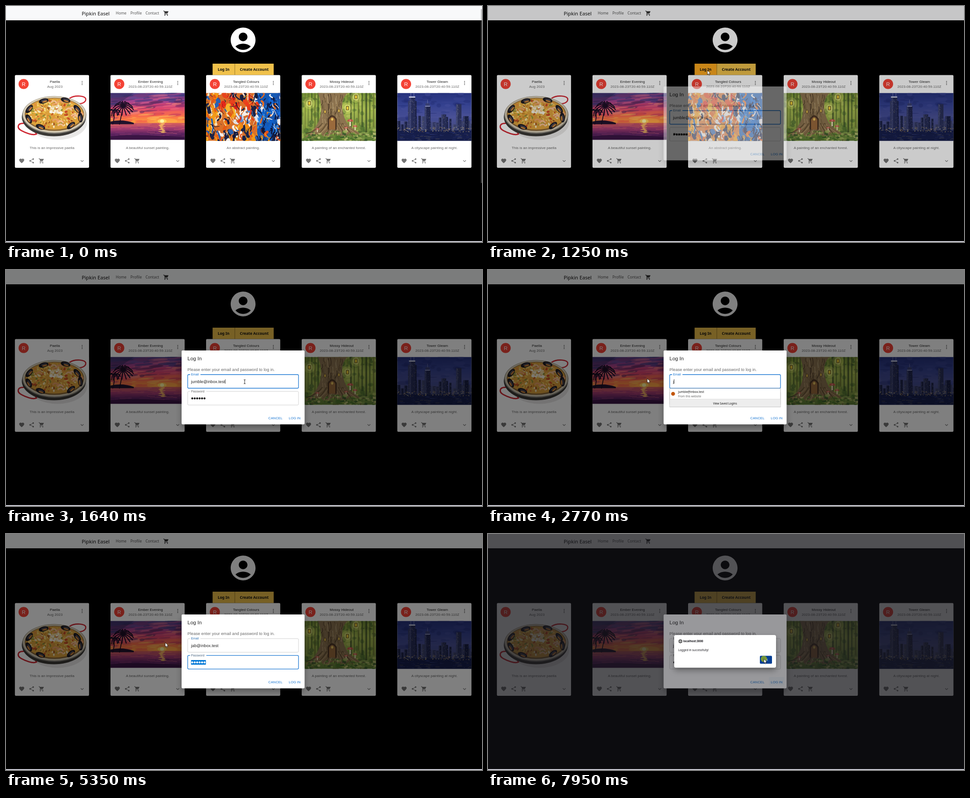
An HTML page that plays this animation: 1061x528 px, repeating every 8 s.

```html
<!DOCTYPE html>
<html lang="en">
<head>
<meta charset="utf-8">
<title>Gallery login</title>
<style>
  html, body { margin: 0; width: 100%; height: 100%; overflow: hidden; background: #000; }
  svg { display: block; }
  text { white-space: pre; font-family: "Liberation Sans", Arial, sans-serif; }
  .ui { font-family: "Noto Sans", "Open Sans", sans-serif; }
  .mid { text-anchor: middle; }
  .bold { font-weight: 700; }
</style>
</head>
<body>
<svg id="stage" width="1061" height="528" viewBox="0 0 1061 528"></svg>
<script>
const LOOP = 8000;
const BLUE = [25, 118, 210], GRAY = [102, 102, 102];

// ---------- SVG helpers ----------
let seed = 7;
const rnd = (a = 1, b = 0) => {
  seed = (seed * 16807) % 2147483647;
  return b + (a - b) * seed / 2147483647;
};
const pick = list => list[Math.floor(rnd() * list.length)];
const many = (n, make) => Array.from({ length: n }, (_, i) => make(i)).join('');
const n1 = v => +v.toFixed(1);
const rect = (x, y, w, h, fill, more = '') =>
  `<rect x="${n1(x)}" y="${n1(y)}" width="${n1(w)}" height="${n1(h)}" fill="${fill}" ${more}/>`;
const oval = (x, y, rx, ry, fill, more = '') =>
  `<ellipse cx="${n1(x)}" cy="${n1(y)}" rx="${n1(rx)}" ry="${n1(ry)}" fill="${fill}" ${more}/>`;
const path = (d, fill, more = '') => `<path d="${d}" fill="${fill}" ${more}/>`;
const line = (d, stroke, width, more = '') =>
  path(d, 'none', `stroke="${stroke}" stroke-width="${n1(width)}" stroke-linecap="round" ${more}`);
const text = (x, y, size, str, fill, more = '') =>
  `<text x="${x}" y="${y}" font-size="${size}" fill="${fill}" ${more}>${str}</text>`;
const gradient = (id, ...colors) =>
  `<linearGradient id="${id}" x2="0" y2="1">${colors.map((c, i) =>
    `<stop offset="${i / (colors.length - 1)}" stop-color="${c}"/>`).join('')}</linearGradient>`;

const ICONS = {
  account: 'M12 2C6.48 2 2 6.48 2 12s4.48 10 10 10 10-4.48 10-10S17.52 2 12 2zm0 4c1.93 0 3.5 1.57 3.5 3.5S13.93 13 12 13s-3.5-1.57-3.5-3.5S10.07 6 12 6zm0 14c-2.03 0-4.43-.82-6.14-2.88C7.55 15.8 9.68 15 12 15s4.45.8 6.14 2.12C16.43 19.18 14.03 20 12 20z',
  heart: 'M12 21.35l-1.45-1.32C5.4 15.36 2 12.28 2 8.5 2 5.42 4.42 3 7.5 3c1.74 0 3.41.81 4.5 2.09C13.09 3.81 14.76 3 16.5 3 19.58 3 22 5.42 22 8.5c0 3.78-3.4 6.86-8.55 11.54z',
  share: 'M18 16.08c-.76 0-1.44.3-1.96.77L8.91 12.7c.05-.23.09-.46.09-.7s-.04-.47-.09-.7l7.05-4.11c.54.5 1.25.81 2.04.81 1.66 0 3-1.34 3-3s-1.34-3-3-3-3 1.34-3 3c0 .24.04.47.09.7L8.04 9.81C7.5 9.31 6.79 9 6 9c-1.66 0-3 1.34-3 3s1.34 3 3 3c.79 0 1.5-.31 2.04-.81l7.12 4.16c-.05.21-.08.43-.08.65 0 1.61 1.31 2.92 2.92 2.92s2.92-1.31 2.92-2.92-1.31-2.92-2.92-2.92z',
  cart: 'M7 18c-1.1 0-1.99.9-1.99 2S5.9 22 7 22s2-.9 2-2-.9-2-2-2zM1 2v2h2l3.6 7.59-1.35 2.45c-.16.28-.25.61-.25.96 0 1.1.9 2 2 2h12v-2H7.42c-.14 0-.25-.11-.25-.25l.03-.12.9-1.63h7.45c.75 0 1.41-.41 1.75-1.03l3.58-6.49c.08-.14.12-.31.12-.48 0-.55-.45-1-1-1H5.21l-.94-2H1zm16 16c-1.1 0-1.99.9-1.99 2s.89 2 1.99 2 2-.9 2-2-.9-2-2-2z',
  more: 'M12 4a2 2 0 100 4 2 2 0 000-4zm0 6a2 2 0 100 4 2 2 0 000-4zm0 6a2 2 0 100 4 2 2 0 000-4z',
  expand: 'M16.59 8.59L12 13.17 7.41 8.59 6 10l6 6 6-6z'
};
const icon = (name, cx, cy, fill, scale = .565) =>
  path(ICONS[name], fill, `transform="translate(${cx} ${cy}) scale(${scale}) translate(-12 -12)"`);

// ---------- Pictures, each 166 x 107 ----------
function paella() {
  const inPan = make => { const a = rnd(6.28), r = Math.sqrt(rnd()); return make(88 + 59 * r * Math.cos(a), 46 + 31 * r * Math.sin(a), a); };
  const mussel = (x, y, a) => `<g transform="translate(${x} ${y}) rotate(${a})">` +
    oval(0, 0, 11, 5.5, '#1c1a22') + oval(1, -1, 7, 2, '#4b4650') + oval(2, 2, 6, 1.8, '#c98238') + '</g>';
  return rect(0, 0, 166, 107, '#fff') + oval(95, 66, 66, 39, '#e9e8e7') +
    line('M122 12C134 4 158 6 158 14S148 25 139 24', '#cf2a35', 2.6) +
    line('M19 68C4 68 5 79 14 84S40 96 48 92L45 86', '#cf2a35', 3) +
    oval(87, 54, 71.5, 43, '#3a3835') + oval(88, 49, 71.5, 42, '#8e8a80') + oval(88, 48, 70, 40.5, '#d8cdb5') + oval(88, 48, 66, 37, '#8a6636') + oval(88, 47, 64, 35, '#dca13c') +
    many(260, () => inPan((x, y, a) => oval(x, y, rnd(4, 1), rnd(2.4, .8),
      pick(['#edbb46', '#f4d274', '#cd862a', '#e2913f', '#f6e4b4', '#a55a22', '#8a9138', '#c94a26', '#f0c65a']), `transform="rotate(${n1(a * 57)} ${n1(x)} ${n1(y)})"`))) +
    many(15, i => inPan((x, y) => line(`M${n1(x - 6)} ${n1(y)}q6 -6 11 1`, i % 2 ? '#e9a066' : '#f3bd90', 3.5))) +
    mussel(32, 36, -50) + mussel(31, 58, 60) + mussel(57, 76, 20) + mussel(125, 73, -40) + mussel(139, 36, 50) + mussel(146, 55, 85) + mussel(64, 18, -15) + mussel(113, 16, 15) +
    many(34, () => oval(rnd(104, 76), rnd(47, 28), rnd(5, 2), rnd(3, 1.5), pick(['#f6ead0', '#eed7a0', '#faf3e2', '#f2d9a4'])));
}

function sunset() {
  const cloud = (y, colors) => oval(rnd(170, -5), y, rnd(22, 5), rnd(3.2, .8), pick(colors), `opacity=".6" transform="rotate(-4 83 ${n1(y)})"`);
  return `<defs>${gradient('sky', '#4a3f86', '#a04390', '#dd4a72', '#f9704a', '#fda23e')}${gradient('sea', '#d8605c', '#a53c70', '#5b235f', '#3c1745')}</defs>` +
    rect(0, 0, 166, 68, 'url(#sky)') +
    many(50, () => cloud(rnd(24), ['#3a3a7c', '#5b4a92', '#b04c88', '#e06c8c', '#3c2c5e', '#7a3a78'])) +
    many(45, () => cloud(rnd(46, 22), ['#d83e6a', '#8a2f68', '#f0687c', '#b23872', '#602a60', '#f48878'])) +
    many(32, () => cloud(rnd(64, 46), ['#f2564e', '#f98a48', '#c23a62', '#f76a52', '#fdb45a'])) +
    path('M0 0H52Q36 12 0 34z', '#322a5e', 'opacity=".55"') +
    oval(115, 63, 34, 7, '#ffb347', 'opacity=".55"') + oval(115, 63, 10, 5, '#ffd75c', 'opacity=".8"') + oval(115, 63, 4.5, 4, '#fff6a6') +
    rect(0, 67, 166, 38, 'url(#sea)') +
    many(90, () => { const y = rnd(98, 68);
      return rect(rnd(160, -15), y, rnd(30, 6), rnd(1.3, .4), pick(y < 84 ? ['#f08a6a', '#b84878', '#e0666a', '#7c2f6c'] : ['#8a3a78', '#42184c', '#c4587c', '#6a2a6a']), 'opacity=".65"'); }) +
    many(16, i => oval(115 + rnd(4, -4), 68 + i * 1.4, rnd(8, 2), .6, '#ffc861')) +
    path('M0 97Q60 91 166 99V105H0z', '#3a1544') + path('M0 64Q26 58 52 67V70H0z', '#22122c') +
    line('M20 70Q24 52 28 30M5 70Q10 54 8 40', '#190c20', 1.8) +
    many(15, i => { const a = i * .42, x = 28 + 23 * Math.cos(a), y = 30 + 13 * Math.sin(a);
      return line(`M28 30Q${n1((28 + x) / 2)} ${n1(y - 6)} ${n1(x)} ${n1(y + 7)}`, '#1d0f26', 2.2); }) +
    many(10, i => line(`M8 41Q${n1(8 + 8 * Math.cos(i))} 34 ${n1(8 + 14 * Math.cos(i))} ${n1(44 + 8 * Math.sin(i))}`, '#1d0f26', 2));
}

function abstract() {
  const warm = ['#f29a18', '#f7b52c', '#e55a14', '#1a2347', '#f4dfb4', '#f08a10', '#2560b4'];
  const red = ['#e3281a', '#ef3a1a', '#e8431c', '#f3eee8', '#c41e18', '#182040'];
  const white = ['#f3eee8', '#f8f5f2', '#dfe3ec', '#5c8bce', '#e3381c', '#1a2347'];
  const cool = ['#1268d8', '#1b4fa8', '#0f5fc8', '#0f1f4d', '#2f8ae8', '#ed6b18', '#e9eaf0'];
  const dark = ['#10183c', '#1a2347', '#f29a18', '#e5521c', '#f3eee8', '#2b62b0'];
  const at = (x, y) => x < 26 ? warm : x > 114 ? (y > 78 ? dark : cool) : y < 28 ? red : x > 64 && y < 66 ? white : y > 74 ? dark : warm;
  return rect(0, 0, 166, 107, '#d9702a') + rect(114, 0, 52, 107, '#1559b4') +
    many(330, i => { const x = rnd(166), y = rnd(107, -6);
      return line(`M${n1(x)} ${n1(y)}q${n1(rnd(6, -6))} ${n1(rnd(8, 1))} ${n1(rnd(8, -6))} ${n1(rnd(17, 3))}`, pick(at(x, y)), i < 120 ? rnd(10, 4) : rnd(4, .8)); }) +
    many(45, () => line(`M${n1(rnd(166))} ${n1(rnd(100))}q${n1(rnd(9, -9))} ${n1(rnd(9, -9))} ${n1(rnd(12, -12))} ${n1(rnd(18, -4))}`, pick(['#10152e', '#10152e', '#f6cc36', '#f8f5f0']), rnd(1.4, .4)));
}

function forest() {
  const lantern = (x, y) => line(`M${x} 0V${y}`, '#4b4a22', .6) + oval(x, y + 3, 13, 13, '#e6ec70', 'opacity=".3"') + oval(x, y + 3, 7, 8, '#f2f08a', 'opacity=".5"') + rect(x - 2.5, y - 1, 5, 8, '#f0cf3c', 'stroke="#4d3f1c"');
  const mushroom = (x, y, r) => rect(x - r / 4, y, r / 2, r * 1.5, '#ead9b4') + path(`M${x - r} ${y}a${r} ${r * .8} 0 0 1 ${2 * r} 0z`, '#c4584a') + oval(x, y - r * .4, 1, .7, '#fff');
  return `<defs>${gradient('wood', '#6f8c34', '#a5b950', '#8aa046', '#5b7a34')}</defs>` + rect(0, 0, 166, 107, 'url(#wood)') +
    many(180, () => oval(rnd(166), rnd(107), rnd(7, 1.5), rnd(7, 1.5), pick(['#8fac3e', '#4f7030', '#c8cf6a', '#38592a', '#a5b54c', '#6c8436']), 'opacity=".5"')) +
    many(13, i => rect(i < 6 ? i * 7 : 108 + (i - 6) * 8.5, 0, rnd(4, 1), rnd(92, 60), pick(['#445a28', '#66702f', '#384a26']), 'opacity=".75"')) +
    path('M36 0H102Q87 14 91 38T106 74L132 92 108 88 96 97 72 90 50 99 42 90 6 100Q34 80 41 54T36 0z', '#8c7350') +
    many(85, () => { const y = rnd(72), x = rnd(90 + y / 20, 45);
      return line(`M${n1(x)} ${n1(y)}q${n1(rnd(3, -3))} 8 ${n1(rnd(4, -4))} ${n1(rnd(22, 8))}`, pick(['#5f4b32', '#ab9068', '#94794f', '#4c3a28', '#bba57c', '#76603f']), rnd(1.7, .5)); }) +
    many(18, i => line(`M${46 + i * 3} ${68 + i % 3 * 3}Q${36 + i * 4.5} 82 ${10 + i * 7} ${92 + i % 4 * 2}`, ['#5c482d', '#a98c62', '#806740'][i % 3], 1.6)) +
    path('M58 82V58Q68 42 78 58V82z', '#4a3524') + path('M61 82V60Q68 47 75 60V82z', '#9a6a3c') + oval(68, 59, 2.5, 3, '#e6c35c') +
    oval(52, 42, 2.5, 4, '#dcb94f', 'stroke="#4a3524"') + oval(83, 40, 2.5, 4, '#dcb94f', 'stroke="#4a3524"') +
    lantern(17, 20) + lantern(102, 31) + lantern(121, 6) +
    mushroom(108, 64, 7) + mushroom(119, 76, 5) + mushroom(99, 79, 4) + mushroom(35, 82, 4) +
    many(130, () => oval(rnd(166), rnd(110, 86), rnd(5, 1), rnd(3, .8), pick(['#49712b', '#7d9848', '#34562a', '#9aac58', '#c4c27a', '#6b6a3a']), 'opacity=".8"'));
}

function city() {
  const tower = (x, y, w, fill) => rect(x, y, w, 86 - y, fill) + rect(x, y, w * .3, 86 - y, '#6d76ac', 'opacity=".3"') +
    many(Math.round(w * (86 - y) / 20), () => rect(rnd(x + w - 1, x), rnd(84, y + 2), 1.1, .9, pick(['#8d8fae', '#d0c08c', '#5a659c']), 'opacity=".6"'));
  return `<defs>${gradient('night', '#26327c', '#34418f', '#4a5196', '#444a80', '#1c2658')}</defs>` + rect(0, 0, 166, 107, 'url(#night)') +
    many(70, () => oval(rnd(166), rnd(65), rnd(16, 4), rnd(5, 1), pick(['#222b70', '#4a529c', '#2c3884', '#3c4692']), 'opacity=".4"')) +
    many(22, i => tower(i * 7.7, rnd(76, 50), rnd(9, 5), pick(['#262c58', '#1c2246', '#30365f', '#3a4068']))) +
    tower(24, 18, 19, '#1c2248') + tower(27, 9, 13, '#262c56') + line('M30 9V1M37 9V1', '#8a90ba', .8) + rect(26, 8, 14, 2.4, '#dcdff2') +
    tower(61, 30, 13, '#20264e') + rect(63, 23, 9, 8, '#383f70') + line('M67.5 23V16', '#7f85b0', .8) + rect(62, 29, 11, 1.5, '#9ba2cc') +
    tower(98, 48, 11, '#262c54') + tower(131, 25, 12, '#2a3058') + tower(147, 52, 12, '#191f42') +
    rect(0, 84, 166, 23, '#161e4a') +
    many(90, () => rect(rnd(166), rnd(87, 76), rnd(3, .8), 1.1, pick(['#e9cd78', '#f4e6ac', '#d49a53', '#b9a878']), 'opacity=".75"')) +
    many(90, () => rect(rnd(166), rnd(106, 87), rnd(11, 2), .8, pick(['#313d7c', '#4a5290', '#77715f', '#10183f', '#28336c']), 'opacity=".65"'));
}

// ---------- Page ----------
const STAMP = '2023-08-23T20:40:59.110Z';
const CARDS = [
  ['Paella', 'Aug 2023', 'This is an impressive paella', paella, 107.5],
  ['Ember Evening', STAMP, 'A beautiful sunset painting.', sunset, 105],
  ['Tangled Colours', STAMP, 'An abstract painting.', abstract, 107.5],
  ['Mossy Hideout', STAMP, 'A painting of an enchanted forest.', forest, 107.5],
  ['Tower Gleam', STAMP, 'A cityscape painting at night.', city, 107.5]
];
const small = 'class="mid" letter-spacing=".08"';

const card = ([title, date, about, picture, height], i) => `<g transform="translate(${n1(19.8 + i * 213.1)} 154.5)">` +
  rect(0, 0, 165.3, 207.5, '#fff', 'rx="2.3"') +
  oval(19.5, 20, 11.3, 11.3, '#f44336') + text(19.5, 24.1, 11.4, 'R', '#fff', 'class="mid"') +
  text(89.2, 17.3, 7.95, title, '#212121', small) + text(89.2, 28.6, 7.95, date, '#666', small) +
  icon('more', 149.9, 17.8, '#757575') +
  `<svg y="40" width="165.3" height="${height}">${picture()}</svg>` +
  text(82.8, 165, 7.95, about, '#666', small) +
  icon('heart', 15.2, 192, '#757575') + icon('share', 37.4, 192, '#757575') + icon('cart', 59.4, 192, '#757575') + icon('expand', 149.9, 192.3, '#757575') + '</g>';

const field = (id, y, label) =>
  rect(405, y, 247, 30.5, 'none', `id="${id}Box" rx="2.3"`) +
  rect(410.5, y - 2, label.length > 5 ? 36 : 23, 4, '#fff', `id="${id}Notch"`) +
  text(412.5, y + 2.3, 6.8, label, '#666', `id="${id}Label"`);

const dots = many(6, i => `<circle class="dot" cx="${415.2 + i * 5.45}" cy="287.3" r="2.2"/>`);

const page = rect(0, 0, 1061, 32, '#f8f9fa') +
  text(168.7, 20.6, 11.2, 'Pipkin Easel', '#111', 'class="ui"') +
  ['Home', 'Profile', 'Contact'].map((s, i) => text([244.7, 277.3, 311][i], 19.2, 8.4, s, '#555', 'class="ui"')).join('') +
  icon('cart', 357, 16.2, '#333') +
  icon('account', 528.5, 76, '#fff', 2.77) +
  rect(460.5, 129, 49.5, 25.5, '#f0c14b', 'id="loginButton"') + rect(510, 129, 86.7, 25.5, '#f0c14b') +
  rect(509.6, 129, .8, 25.5, '#80651e') +
  text(485, 145, 8.4, 'Log In', '#111', 'class="ui mid bold"') + text(553.3, 145, 8.4, 'Create Account', '#111', 'class="ui mid bold"') +
  CARDS.map(card).join('') +
  rect(1059, 7, 1, 389, '#8a8a8a', 'id="scrollbar"');

const dialog = '<g id="dialog">' +
  rect(391.5, 180, 274, 165.2, '#fff', 'rx="2.3" filter="url(#shadow)"') +
  text(404.6, 202, 11.4, 'Log In', '#212121') +
  text(404.6, 226, 9.05, 'Please enter your email and password to log in.', '#666', 'letter-spacing=".08"') +
  field('email', 234, 'Email') + field('pass', 271.6, 'Password') +
  rect(412.5, 244, 0, 10.5, '#0078d7', 'id="emailMark"') + text(412.5, 252.6, 9.05, '', '#212121', 'id="email" letter-spacing=".08"') +
  rect(412.5, 282, 33, 10.4, '#0078d7', 'id="passMark"') + dots +
  rect(0, 0, .8, 10, '#222', 'id="caret"') +
  `<clipPath id="buttonShape">${rect(626, 320, 34.5, 19.3, '#000', 'rx="2.3"')}</clipPath>` +
  rect(626, 320, 34.5, 19.3, '#1976d2', 'id="hover" rx="2.3"') +
  '<circle id="ripple" cx="634" cy="330" fill="#1976d2" clip-path="url(#buttonShape)"/>' +
  text(600.5, 333.5, 7.6, 'CANCEL', '#1976d2', 'class="mid" letter-spacing=".1"') +
  text(643.5, 333.5, 7.6, 'LOG IN', '#1976d2', 'class="mid" letter-spacing=".1"') +
  '<g id="suggest">' + rect(405, 265, 247, 41.5, '#fff', 'stroke="#aaa" stroke-width=".8"') +
  rect(405.4, 289, 246.2, 17.2, '#ededed') + rect(405.4, 288.6, 246.2, .6, '#ccc') +
  oval(412.5, 277, 4.3, 4.3, '#c2570c') +
  text(423.7, 274.6, 6.6, 'jumble@inbox.test', '#111', 'class="ui"') +
  text(423.7, 284.6, 6.2, 'From this website', '#666', 'class="ui"') +
  text(528.3, 300.5, 6.2, 'View Saved Logins', '#111', 'class="ui mid"') + '</g></g>';

const notice = '<g id="alert">' + rect(0, 0, 1061, 528, '#1c1b22', 'opacity=".45"') +
  rect(415, 226, 227, 73, '#fff', 'rx="4" filter="url(#shadow)"') +
  `<g fill="none" stroke="#222" stroke-width=".8"><circle cx="428.8" cy="240" r="4"/><ellipse cx="428.8" cy="240" rx="1.8" ry="4"/><path d="M425 238.5h7.6M425 241.5h7.6"/></g>` +
  text(435, 242.2, 6.25, 'localhost:3000', '#15141a', 'class="ui" font-weight="600"') +
  text(424, 262.3, 6.3, 'Logged in successfully!', '#15141a', 'class="ui"') +
  rect(606, 272.4, 27, 17.8, '#0061e0', 'id="ok" rx="2"') + text(619.5, 283.7, 6.4, 'OK', '#fff', 'class="ui mid"') +
  oval(615, 279.5, 7, 7, '#88a428', 'id="press" opacity=".85"') + '</g>';

const stage = document.getElementById('stage');
stage.innerHTML = '<defs><filter id="shadow" x="-20%" y="-20%" width="140%" height="150%"><feDropShadow dx="0" dy="6" stdDeviation="7" flood-opacity=".35"/></filter></defs>' +
  rect(0, 0, 1061, 528, '#000') + page + rect(0, 0, 1061, 528, '#000', 'id="backdrop"') + dialog + notice +
  '<g id="cursor">' + path('M0 0V9.6L2.2 7.6 3.7 11 5.3 10.3 3.8 7H6.8z', '#fff', 'id="arrow" stroke="#000" stroke-width=".7"') +
  line('M-1.6 -4.6Q0 -4.6 0 -3.6Q0 -4.6 1.6 -4.6M0 -4V4M-1.6 4.6Q0 4.6 0 3.6Q0 4.6 1.6 4.6', '#111', .9, 'id="beam"') + '</g>' +
  rect(0, 526, 1061, 2, '#d9d9e3');

const el = id => document.getElementById(id);
const set = (id, attrs) => { for (const k in attrs) el(id).setAttribute(k, attrs[k]); };
const show = (id, on) => set(id, { visibility: on ? 'visible' : 'hidden' });
const dotNodes = [...document.querySelectorAll('.dot')];

// ---------- Timeline ----------
const ramp = (t, from, length) => Math.min(1, Math.max(0, (t - from) / length));
const mix = (a, b, p) => a + (b - a) * p;
const between = (t, a, b) => t >= a && t < b;
const OLD_EMAIL = 'jumble@inbox.test', NEW_EMAIL = 'jab@inbox.test';
const EMAIL_KEYS = [2770, 2870, 2970, 3170, 3440, 4360, 4500, 4560, 4760, 4850, 4940, 5020, 5160, 5220];
const PASS_KEYS = [5750, 5820, 5880, 6030, 6070, 6100];
const MOVES = [
  [320, 818, 509], [640, 690, 340], [1000, 489, 144], [1310, 489, 144], [1620, 532, 250], [1700, 532, 250],
  [1970, 361, 243], [2040, 337, 238], [2170, 359, 217], [2769, 359, 217], [2770, 355, 243], [6540, 355, 243],
  [7080, 634, 325.5], [7360, 634, 325.5], [7850, 615, 279.5]
];

function pointer(t) {
  const i = MOVES.findIndex(m => m[0] > t);
  if (i < 0) return MOVES[MOVES.length - 1].slice(1);
  const [a, b] = [MOVES[Math.max(0, i - 1)], MOVES[i]];
  const p = ramp(t, a[0], b[0] - a[0] || 1);
  return [mix(a[1], b[1], p), mix(a[2], b[2], p)];
}

function styleField(id, t, start, end) {
  const focused = between(t, start, end);
  const p = ramp(t, start, 200) * (1 - ramp(t, end, 200));
  set(id + 'Box', { stroke: focused ? '#1976d2' : '#c4c4c4', 'stroke-width': focused ? 1.3 : .8 });
  set(id + 'Label', { fill: `rgb(${GRAY.map((g, i) => Math.round(mix(g, BLUE[i], p)))})` });
}

function draw(t) {
  const [x, y] = pointer(t);
  const fade = ramp(t, 1160, 225);
  const alertOpen = t >= 7290;

  show('scrollbar', t < 1180);
  const overLogin = x > 460 && x < 510 && y > 129 && y < 155 && between(t, 320, 1320);
  set('loginButton', { fill: overLogin ? '#fca81e' : '#f0c14b' });
  set('backdrop', { opacity: fade / 2 });
  set('dialog', { opacity: fade });

  styleField('email', t, 1150, 5290);
  styleField('pass', t, 5290, 7150);
  const shrink = ramp(t, 1250, 200);
  set('passLabel', { y: mix(290, 273.9, shrink), 'font-size': mix(9.05, 6.8, shrink) });
  set('passNotch', { opacity: shrink });

  // Email text, drag selection and caret
  const typed = EMAIL_KEYS.filter(k => k <= t).length;
  const email = el('email');
  email.textContent = typed ? NEW_EMAIL.slice(0, typed) : OLD_EMAIL;
  const end = 412.5 + email.getComputedTextLength();
  const dragged = between(t, 1700, 2770);
  const markStart = t > 1970 ? 412.5 : Math.min(end, Math.max(412.5, x));
  set('emailMark', { x: markStart, width: dragged ? end - markStart : 0 });
  set('email', { fill: dragged && markStart < 440 ? '#fff' : '#212121' });

  // Password dots
  const retyped = PASS_KEYS.filter(k => k <= t).length;
  const passMarked = between(t, 5290, 5750);
  dotNodes.forEach((d, i) => {
    d.setAttribute('fill', passMarked ? '#fff' : '#1a1a1a');
    d.setAttribute('visibility', t < 5750 || i < retyped ? 'inherit' : 'hidden');
  });
  show('passMark', passMarked);

  const inPass = t >= 5750;
  const lastKey = typed ? EMAIL_KEYS[typed - 1] : 1180;
  const blink = typed ? (t - lastKey) % 730 < 400 : t < 1700;
  show('caret', inPass ? t < 6360 : between(t, 1180, 5290) && blink && !dragged);
  set('caret', { x: inPass ? 412.6 + retyped * 5.45 : end, y: inPass ? 282 : 244.3 });
  show('suggest', between(t, 2770, 2970));

  // Dialog button
  set('hover', { opacity: x > 626 && x < 661 && y > 320 && y < 339 || alertOpen ? .05 : 0 });
  set('ripple', { r: mix(8, 30, ramp(t, 7150, 300)), opacity: t < 7150 ? 0 : .17 * (1 - ramp(t, 7290, 300)) });

  // Browser alert
  show('alert', alertOpen);
  const overOk = alertOpen && x < 633 && y < 290 && y > 272;
  set('ok', { fill: t >= 7880 ? '#053e94' : overOk ? '#0250bb' : '#0061e0' });
  set('press', { display: t >= 7880 ? 'inline' : 'none' });

  const beam = between(t, 1310, 7290) && x > 405 && x < 652 && (between(y, 234, 265) || between(y, 271, 302));
  set('cursor', { transform: `translate(${n1(x)} ${n1(y)})` });
  show('arrow', t >= 320 && !beam);
  show('beam', beam);
}

const begin = performance.now();
function frame() {
  draw((performance.now() - begin) % LOOP);
  requestAnimationFrame(frame);
}
frame();
</script>
</body>
</html>
```
